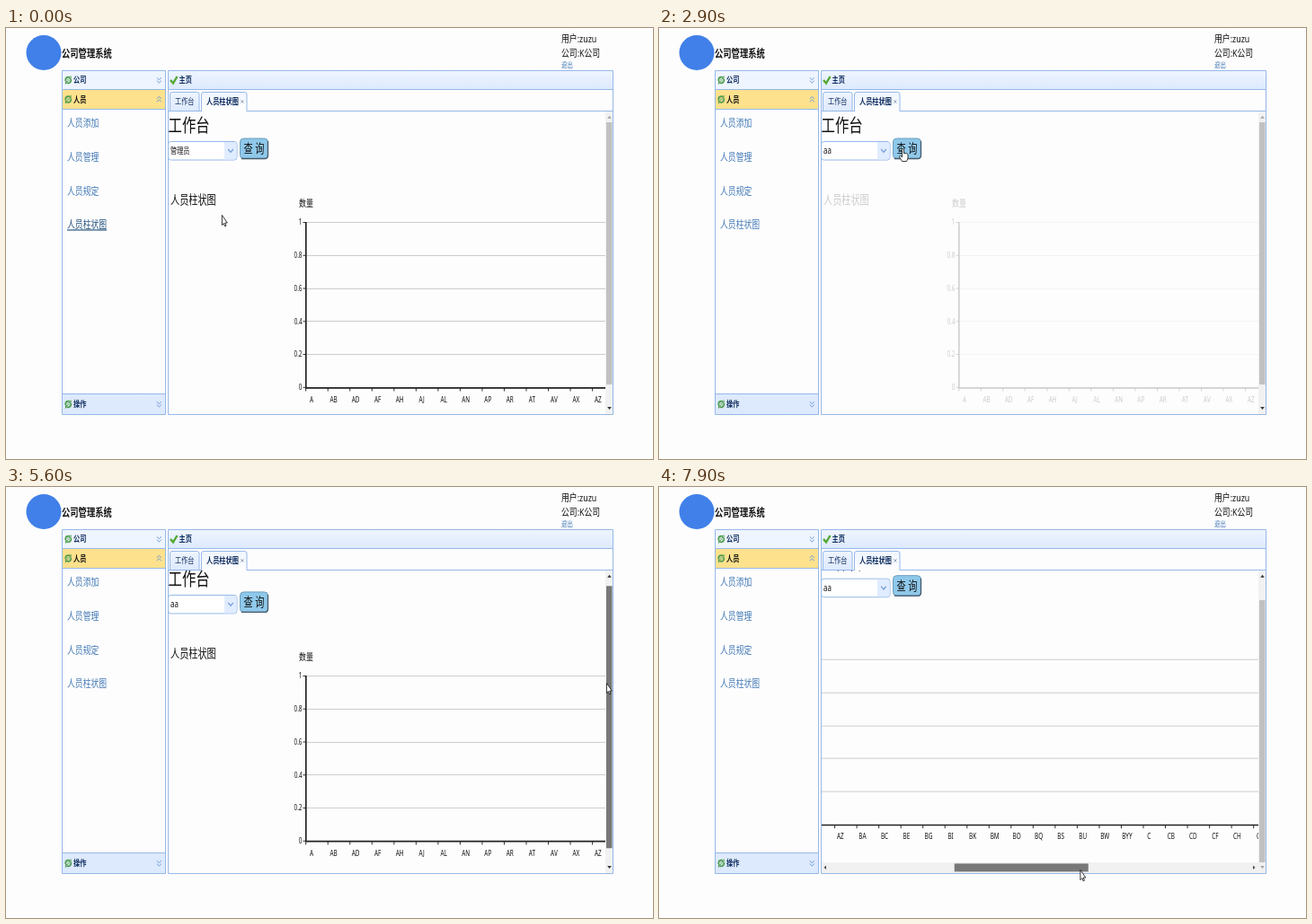
An HTML page that plays this animation: 720x480 px, repeating every 8 s.

```html
<!DOCTYPE html>
<html lang="zh-CN">
<head>
<meta charset="utf-8">
<title>公司管理系统</title>
<style>
html, body { margin: 0; width: 100%; height: 100%; overflow: hidden; background: #fefdfe; }
svg { display: block; width: 720px; height: 480px; }
/* the whole screen is shown narrowed, so all text shares one ratio */
text {
  font: 9.35px "Noto Sans", "Noto Sans CJK SC", "Noto Sans CJK", sans-serif;
  fill: #111; white-space: pre;
  transform-box: fill-box; transform-origin: 0 50%; transform: scaleX(.77);
}
.mid { text-anchor: middle; transform-origin: 50% 50%; }
.end { text-anchor: end; transform-origin: 100% 50%; }
.b { font-weight: 700; }
.navy { fill: #0e2d5f; }
.s8 { font-size: 8.3px; }
.s10 { font-size: 10.3px; }
.s12 { font-size: 11.5px; }
.s13 { font-size: 13.2px; }
.s20 { font-size: 20px; }
.link { fill: #4179b4; }
.focus { fill: #23527c; text-decoration: underline; }
.edge { fill: none; stroke: #95b8e7; }
.ico { fill: none; stroke: #6f9bd8; }
.track { fill: #f1f1f1; }
.thumb { fill: #c1c1c1; }
.arrow { fill: #505050; }
</style>
</head>
<body>
<svg viewBox="0 0 720 480">
  <defs>
    <linearGradient id="bar" x2="0" y2="1"><stop stop-color="#eff5ff"/><stop offset="1" stop-color="#dde9fd"/></linearGradient>
    <linearGradient id="live" x2="0" y2="1"><stop stop-color="#eff5ff"/><stop offset="1" stop-color="#fefefe"/></linearGradient>
    <clipPath id="view"><path d="M181 93H667V430H181Z"/></clipPath>
    <filter id="soft" x="-10%" y="-30%" width="120%" height="160%"><feDropShadow dx="0" dy="1" stdDeviation="1.8" flood-opacity=".35"/></filter>
    <g id="chev" class="ico"><path d="M-2.5-3L0-.6L2.5-3M-2.5 .4L0 2.8L2.5 .4"/></g>
    <g id="cycle" fill="none" stroke="#4c9a4c" stroke-width="1.6">
      <path d="M-3 1V-1Q-2.6-3.6 .6-3.4L2-2.6M3-1V1Q2.6 3.6-.6 3.4L-2 2.6"/>
      <path d="M-2-1.4L2 1.6" stroke="#8cc48c" stroke-width="1.3"/>
      <path d="M2.8-4.6V-1.4H.4M-2.8 4.6V1.4H-.4" stroke-width="1"/>
    </g>
  </defs>

  <rect width="720" height="480" fill="#fefdfe"/>
  <circle cx="42" cy="27.5" r="19.5" fill="#4080e8"/>
  <text class="b" x="62" y="33" style="font-size:12.1px">公司管理系统</text>
  <text class="s12" x="618" y="16.3">用户:zuzu</text>
  <text class="s12" x="618" y="31.6">公司:K公司</text>
  <text class="link" x="618" y="44.2" style="font-size:8.4px">退出</text>

  <!-- side menu -->
  <path d="M62.5 47.5H177.5V68.5H62.5ZM62.5 407.5H177.5V430H62.5Z" fill="url(#bar)"/>
  <path d="M63 69H177V90H63Z" fill="#fde18c"/>
  <path class="edge" d="M62.5 47.5H177.5V430.5H62.5ZM62.5 68.5H177.5M62.5 90.5H177.5M62.5 407.5H177.5"/>
  <use href="#cycle" x="69.3" y="58"/><use href="#cycle" x="69.3" y="79.5"/><use href="#cycle" x="69.3" y="419"/>
  <use href="#chev" x="170.3" y="58.3"/><use href="#chev" x="170.3" y="419.2"/>
  <use href="#chev" transform="translate(170.3 79.2) scale(1 -1)"/>
  <text class="b navy" x="75" y="61.4">公司</text>
  <text class="b" x="75" y="83">人员</text>
  <text class="b navy" x="75" y="422.4">操作</text>
  <text class="link s12" x="68" y="110.4">人员添加</text>
  <text class="link s12" x="68" y="148.3">人员管理</text>
  <text class="link s12" x="68" y="185.8">人员规定</text>
  <text class="link s12" x="68" y="223.3" id="menu">人员柱状图</text>

  <!-- main panel -->
  <path d="M180.5 47.5H675.5V68.5H180.5Z" fill="url(#bar)"/>
  <path class="edge" d="M180.5 47.5H675.5V430.5H180.5ZM180.5 68.5H675.5M180.5 92.5H675.5"/>
  <path d="M183 58L186 61.5L190.5 54" fill="none" stroke="#53a832" stroke-width="2.4"/>
  <text class="b navy" x="192.5" y="61.4">主页</text>
  <path class="edge" d="M182.5 92.5V74Q182.5 71.5 185 71.5H212.500Q215 71.5 215 74V92.5Z" style="fill:url(#bar)"/>
  <path class="edge" d="M217.5 93V74Q217.5 71.5 220 71.5H265.500Q268 71.500 268 74V93" style="fill:url(#live)"/>
  <text class="navy" x="188" y="85.2">工作台</text>
  <text class="b navy" x="223" y="85.2">人员柱状图</text>
  <path d="M261.5 80.3L264.3 83.5M264.3 80.3L261.5 83.5" stroke="#8496b4" stroke-width=".9"/>

  <g clip-path="url(#view)">
    <g id="page">
      <text class="s20" x="180.5" y="116.400">工作台</text>
      <rect class="edge" x="180.5" y="126.5" width="76.5" height="20.5" rx="3" style="fill:#fff"/>
      <path d="M243 127H254.500Q256.500 127 256.500 129V144.500Q256.500 146.500 254.500 146.500H243Z" fill="#e0ecff"/>
      <path class="ico" d="M247.200 135L250 138.300L252.800 135" stroke-width="1.2"/>
      <text x="183" y="140.200" id="value"></text>
      <path id="caret" d="M0 131V142" stroke="#222"/>
      <rect x="260.500" y="123" width="31" height="22.500" rx="4" fill="#8fc8ea" stroke="#6a9dbd"/>
      <path d="M262 145.500H288Q291.500 145.500 291.500 142V126" fill="none" stroke="#44596a" stroke-width="1.3"/>
      <text class="s13 mid" x="276" y="139.500">查 询</text>

      <g id="chart">
        <text class="s13" x="183" y="196">人员柱状图</text>
        <text class="s10" x="326" y="199">数量</text>
        <path id="grid" stroke="#ccc"/>
        <path id="ticks" stroke="#333" fill="none"/>
        <path d="M333.800 216V400.800H1700" fill="none" stroke="#222" stroke-width="1.700"/>
        <g id="labels"></g>
      </g>

      <g id="list">
        <rect class="edge" x="180.500" y="147.500" width="76.500" height="208.500" style="fill:#fefefe"/>
        <path id="hover" d="M181 170H256.500V192H181Z" fill="#eaf2ff"/>
        <path id="pick" d="M181 148H256.500V170H181Z" fill="#fde18c"/>
        <text x="183" y="163">管理员</text>
        <text class="s10" x="183" y="185">aa</text>
      </g>

      <path class="track" d="M180 442.300H667V455H180Z"/>
      <path class="arrow" d="M183.500 448L186 445.700V450.300Z"/>
      <path class="arrow" d="M663.500 448L661 445.700V450.300Z"/>
      <rect class="thumb" id="hthumb" y="443.700" width="149" height="9"/>
    </g>
  </g>
  <path class="track" d="M667 93H675V430H667Z"/>
  <rect class="thumb" id="vthumb" x="668" width="6.500" height="292"/>
  <path id="up" d="M669.200 100.800H673.800L671.500 97.800Z"/>
  <path id="down" d="M669.200 422H673.800L671.500 425Z"/>

  <!-- input method bar -->
  <g id="ime">
    <rect x="611" y="366.500" width="115" height="18" rx="2" fill="#fefefe" stroke="#dde5ef"/>
    <rect x="608" y="366" width="13.500" height="17.500" rx="1.500" fill="#f0541e"/>
    <text class="b mid" x="630" y="379.300" style="fill:#1b6fd6;font-size:10.500px">中</text>
    <g fill="#1b6fd6">
      <circle cx="640.500" cy="373.500" r="1.300"/><path d="M643 376H645.500Q645.500 379 643 379.500Z"/>
      <ellipse cx="654.500" cy="375.700" rx="4" ry="5"/>
      <rect x="664.800" y="370" width="3.600" height="7" rx="1.800"/>
      <path d="M663.200 374.500Q663.200 379 666.600 379T670 374.500M666.600 379V381.300" fill="none" stroke="#1b6fd6"/>
      <rect x="675.300" y="371.500" width="7.400" height="8.500" rx="1" fill="none" stroke="#1b6fd6" stroke-width="1.200"/>
      <path d="M676.500 374H681.500M676.500 376H681.500M676.500 378H681.500" stroke="#1b6fd6"/>
      <circle cx="691" cy="372.500" r="2.200"/><path d="M687.500 381V377.500Q691 374.500 693 376.500H695.500V381Z"/>
      <path d="M701.500 371H705.500L708 373L706.800 375.500L705.800 375V381H701.200V375L700.200 375.500L699 373Z"/>
      <path d="M712 371H715.200V375H712ZM716 371H719.200V375H716ZM712 376.500H715.200V380.500H712ZM716 376.500H719.200V380.500H716Z"/>
    </g>
    <path d="M652.300 377Q654.500 380 656.700 377M652.600 373.200V374.700M656.400 373.200V374.700" fill="none" stroke="#fff"/>
  </g>

  <g id="dialog">
    <rect x="238.500" y="-40" width="230.500" height="88.500" rx="2" fill="#fff" filter="url(#soft)"/>
    <text x="247" y="1" style="fill:#555">查询出错...</text>
    <rect x="428" y="15.500" width="32.500" height="22.500" rx="2" fill="#4285f4"/>
    <text class="mid" x="444.200" y="30.300" style="fill:#fff;font-size:8.800px">确定</text>
  </g>

  <g id="cursor" fill="#fff" stroke="#222" stroke-width=".9" stroke-linejoin="round">
    <path id="ptr" d="M.4 .4V11.600L2.300 9.600L3.700 12.900L5 12.200L3.700 9H6.300Z"/>
    <path id="hand" d="M-1 1Q0-.8 1 1V5Q5.500 4.600 5.500 7V10.500Q5 12.500 4 14H-1L-3.800 9.400Q-4.200 7.600-2.800 7.600L-1 9.300Z"/>
  </g>
</svg>

<script>
const $ = id => document.getElementById(id);
const LOOP = 8000, STEP = 100, SCROLL = 24.3, GAP = 24.53;

// [time, x, y]
const path = [
  [0, 240, 208], [100, 240, 208], [500, 250, 140], [900, 249, 141], [1200, 198, 166],
  [1400, 193, 179], [1800, 193, 179], [2300, 271.500, 134.500], [3700, 271.500, 134.500],
  [3900, 305, 168], [4100, 370, 125], [4400, 440, 28], [4800, 442, 28], [4900, 458, 52],
  [5100, 543, 165], [5400, 667, 215], [5600, 668, 218], [5900, 668, 240],
  [6300, 668, 240], [7000, 323, 426], [7200, 323, 426], [7300, 328.500, 426], [7900, 468.500, 426]
];
const vScroll = [[5500, 0], [5900, SCROLL]];
const hScroll = [[7200, 0], [7300, 21.3], [7900, 457]];
const fade = [[3700, 0], [3900, 1], [5000, 1], [5100, .87], [5200, .3], [5300, 0]];

function at(keys, t, i = 1) {
  const n = keys.findIndex(k => k[0] > t);
  if (n === 0) return keys[0][i];
  if (n < 0) return keys[keys.length - 1][i];
  const a = keys[n - 1], b = keys[n];
  return a[i] + (b[i] - a[i]) * (t - a[0]) / (b[0] - a[0]);
}

function label(x, y, str, cls) {
  const el = document.createElementNS("http://www.w3.org/2000/svg", "text");
  el.setAttribute("x", x);
  el.setAttribute("y", y);
  el.setAttribute("class", "s8 " + cls);
  el.textContent = str;
  $("labels").append(el);
}

function buildChart() {
  const join = (head, tails) => [...tails].map(c => head + c);
  const names = ["A", ...join("A", "BDFHJLNPRTVXZ"), ...join("B", "ACEGIKMOQSUW"),
    "BYY", "C", ...join("C", "BDFHJLNPRTVXZ")];
  let grid = "", ticks = "";
  for (let i = 0; i <= 5; i++) {
    const y = 400.3 - i * 36.75;
    if (i) grid += `M334 ${Math.floor(y) + .5}H1700`;
    ticks += `M330.500 ${y}H334`;
    label(329.5, y + 2.9, String(i / 5), "end");
  }
  names.forEach((name, i) => {
    ticks += `M${333.7 + i * GAP} 401V404.500`;
    label(340 + i * GAP, 416.7, name, "mid");
  });
  $("grid").setAttribute("d", grid);
  $("ticks").setAttribute("d", ticks);
}

const show = (id, on) => $(id).style.display = on ? "" : "none";
const move = (id, x, y) => $(id).setAttribute("transform", `translate(${x} ${y})`);
const within = (t, a, b) => t >= a && t < b;

function draw() {
  const t = Math.floor(performance.now() % LOOP / STEP) * STEP;
  const v = at(vScroll, t), h = at(hScroll, t);
  const chosen = t >= 1700, focused = within(t, 600, 2400);

  $("menu").classList.toggle("focus", t < 600);
  $("value").textContent = chosen ? "aa" : "管理员";
  $("value").classList.toggle("s10", chosen);
  show("caret", focused && t % 1000 < 500);
  move("caret", chosen ? 193 : 205.5, 0);
  show("list", within(t, 700, 1800));
  show("hover", within(t, 1400, 1700));
  move("pick", 0, chosen ? 22 : 0);
  show("ime", within(t, 700, 2400));
  $("chart").setAttribute("opacity", within(t, 2500, 5000) ? .2 : 1);
  $("dialog").setAttribute("opacity", at(fade, t));

  move("page", 0, -v);
  move("chart", -h, 0);
  $("vthumb").setAttribute("y", 105 + v / SCROLL * 21);
  $("hthumb").setAttribute("x", 189 + h / 3.27);
  $("vthumb").style.fill = within(t, 5500, 6400) ? "#787878" : "";
  $("hthumb").style.fill = t >= 7100 ? "#787878" : "";
  $("up").setAttribute("fill", v > 0 ? "#333" : "#a3a3a3");
  $("down").setAttribute("fill", v < SCROLL ? "#333" : "#a3a3a3");

  const hand = within(t, 2200, 3800);
  show("hand", hand);
  show("ptr", !hand);
  move("cursor", at(path, t, 1), at(path, t, 2));
  requestAnimationFrame(draw);
}

buildChart();
draw();
</script>
</body>
</html>
```
